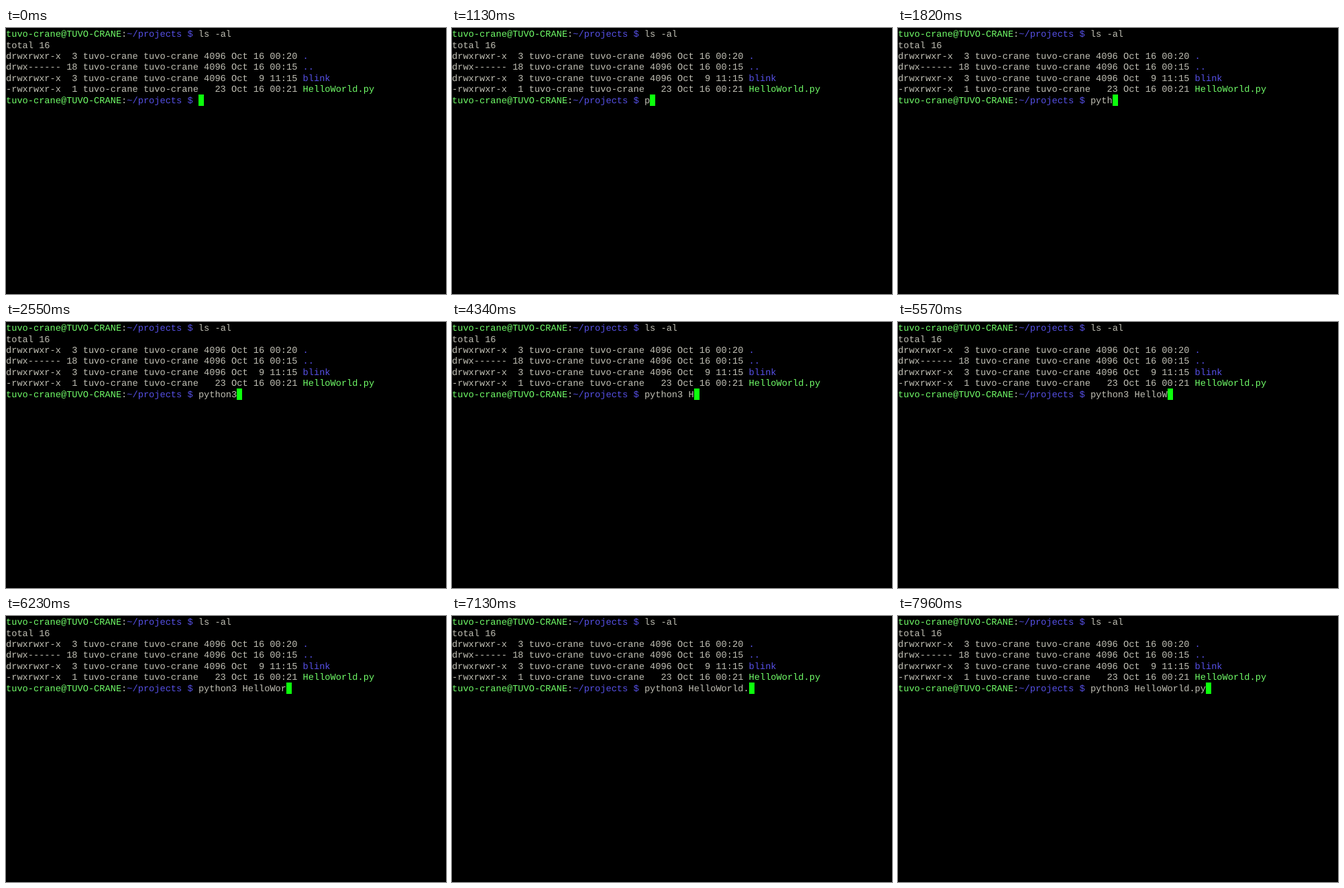
An HTML page that plays this animation: 656x396 px, repeating every 8 s.

```html
<!DOCTYPE html>
<html lang="en">
<head>
<meta charset="utf-8">
<title>Terminal</title>
<style>
html, body { margin: 0; width: 100%; height: 100%; overflow: hidden; background: #000; }
#screen {
  position: absolute; left: 0; top: 3.2px; margin: 0;
  font: 13.667px/16.4px "Liberation Mono", "Courier New", monospace;
  text-rendering: geometricPrecision; font-variant-ligatures: none;
  white-space: pre; color: #c0bfb4;
}
.row { height: 16.4px; }
.host, .exec { color: #70fb68; }
.path, .sign, .dir, .dot { color: #5650e6; }
#cursor { position: absolute; left: 0; top: 99px; width: 8px; height: 17px; background: #0cff0c; }
</style>
</head>
<body>
<div id="screen"></div>
<div id="cursor"></div>
<script>
const CELL = 8.2, PROMPT_COLS = 35, LOOP = 8000;
const user = "tuvo-crane";
const command = "python3 HelloWorld.py";
// When each character of the command appears, in ms
const keys = [830, 1210, 1450, 1690, 1910, 2120, 2330, 2950,
              4010, 4360, 4500, 4810, 5130, 5480, 5760, 6040,
              6310, 6650, 7000, 7350, 7680];

const span = (cls, text) => `<span class="${cls}">${text}</span>`;
const prompt = span("host", `${user}@${user.toUpperCase()}`) + ":" +
  span("path", "~/projects") + " " + span("sign", "$") + " ";
const entry = (mode, links, size, day, time, name) =>
  `${mode} ${links.padStart(2)} ${user} ${user} ${size.padStart(4)} ` +
  `Oct ${day.padStart(2)} ${time} ${name}`;

const rows = [
  prompt + "ls -al",
  "total 16",
  entry("drwxrwxr-x", "3", "4096", "16", "00:20", span("dot", ".")),
  entry("drwx------", "18", "4096", "16", "00:15", span("dot", "..")),
  entry("drwxrwxr-x", "3", "4096", "9", "11:15", span("dir", "blink")),
  entry("-rwxrwxr-x", "1", "23", "16", "00:21", span("exec", "HelloWorld.py")),
  prompt + '<span id="typed"></span>'
];
document.getElementById("screen").innerHTML =
  rows.map(row => `<div class="row">${row}</div>`).join("");

const typed = document.getElementById("typed");
const cursor = document.getElementById("cursor");
const start = performance.now();

function draw() {
  const t = (performance.now() - start) % LOOP;
  const count = keys.filter(k => k <= t).length;
  typed.textContent = command.slice(0, count);
  cursor.style.left = Math.round((PROMPT_COLS + count) * CELL) + "px";
  requestAnimationFrame(draw);
}
draw();
</script>
</body>
</html>
```
